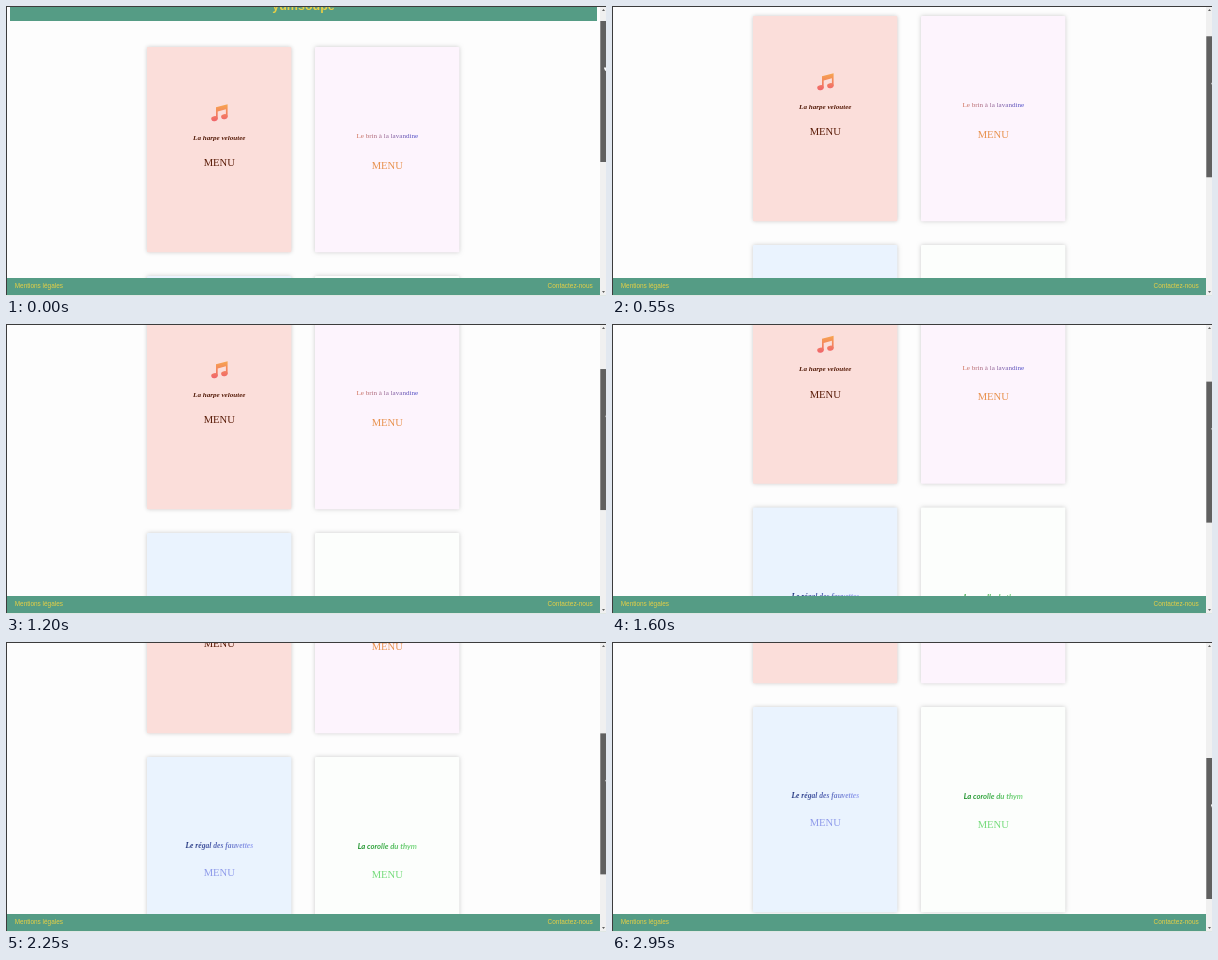
These frames come from a looping animation (600x290 px, 3 s). An HTML page with a canvas:

```html
<!DOCTYPE html>
<html lang="fr">
<head>
<meta charset="utf-8">
<title>Menus</title>
<style>
html, body { margin: 0; width: 100%; height: 100%; overflow: hidden; background: #fdfdfd; }
canvas { display: block; width: 600px; height: 290px; }
</style>
</head>
<body>
<canvas id="stage" width="600" height="290"></canvas>
<script>
const ctx = document.getElementById('stage').getContext('2d');
const LOOP = 3000, STEP = 50;
const GREEN = '#559c85', YELLOW = '#e6cf45';
const SERIF = '"Liberation Serif", serif';
const SANS = '"Liberation Sans", Arial, sans-serif';

// time, scroll distance, pointer x
const DRAG = [
  [0, 0, 598], [550, 31, 599.3], [1200, 61, 599.4], [1600, 86.5, 599.3],
  [1650, 90.7, 599.2], [1850, 121.5, 598.6], [2250, 155, 599.3], [2950, 205, 598.9]
];

const CARDS = [
  { x: 141, y: 41, fill: '#fbdeda', name: 'La harpe veloutee', font: 'italic bold 7.1px ' + SERIF,
    base: 92.5, from: '#4f1a08', to: '#5a1c08', menu: '#5a1c08', menuBase: 119, note: true },
  { x: 309, y: 41, fill: '#fdf4fd', name: 'Le brin à la lavandine', font: '7.1px ' + SERIF,
    base: 91.3, from: '#d8785c', to: '#4c4fd0', menu: '#e8924f', menuBase: 121.5 },
  { x: 141, y: 270, fill: '#eaf3fe', name: 'Le régal des fauvettes', font: 'italic bold 7.6px ' + SERIF,
    base: 91, from: '#22357f', to: '#98a4f2', menu: '#8f9bea', menuBase: 119 },
  { x: 309, y: 270, fill: '#fcfefc', name: 'La corolle du thym', font: 'italic bold 7.7px Lato, sans-serif',
    base: 92, from: '#0f8a1e', to: '#86e08c', menu: '#76dc7c', menuBase: 121 }
];

const secant = i => (DRAG[i + 1][1] - DRAG[i][1]) / (DRAG[i + 1][0] - DRAG[i][0]);

function slope(i) {
  const last = DRAG.length - 1;
  if (i === 0) return secant(0);
  if (i === last) return secant(last - 1);
  const a = secant(i - 1), b = secant(i);
  return 2 * a * b / (a + b);
}

function dragAt(t) {
  t = Math.min(t, 2950);
  let i = 0;
  while (i < DRAG.length - 2 && t > DRAG[i + 1][0]) i++;
  const [t0, y0, x0] = DRAG[i], [t1, y1, x1] = DRAG[i + 1];
  const h = t1 - t0, u = (t - t0) / h, v = 1 - u;
  const scroll = v * v * (1 + 2 * u) * y0 + u * u * (3 - 2 * u) * y1
    + h * u * v * (v * slope(i) - u * slope(i + 1));
  return { scroll, x: x0 + (x1 - x0) * u };
}

function rect(x, y, w, h, fill) {
  ctx.fillStyle = fill;
  ctx.fillRect(x, y, w, h);
}

function text(str, x, y, font, fill, align) {
  ctx.font = font;
  ctx.fillStyle = fill;
  ctx.textAlign = align;
  ctx.fillText(str, x, y);
}

function blend(x0, y0, x1, y1, from, to) {
  const g = ctx.createLinearGradient(x0, y0, x1, y1);
  g.addColorStop(0, from);
  g.addColorStop(1, to);
  return g;
}

function polygon(points) {
  ctx.beginPath();
  points.forEach(([x, y]) => ctx.lineTo(x, y));
  ctx.fill();
}

function musicNote(x, y) {
  ctx.save();
  ctx.translate(x, y);
  ctx.fillStyle = blend(0, 0, 0, 17, '#f7a64f', '#f0646c');
  polygon([[5, 3], [16.6, 0], [16.6, 12.5], [14.9, 12.5], [14.9, 5], [6.7, 7.2], [6.7, 14.5], [5, 14.5]]);
  [[3.5, 14.4], [13.4, 12.4]].forEach(([cx, cy]) => {
    ctx.beginPath();
    ctx.ellipse(cx, cy, 3.3, 2.5, -0.2, 0, 7);
    ctx.fill();
  });
  ctx.restore();
}

function card(c) {
  ctx.save();
  ctx.shadowColor = 'rgba(0,0,0,0.2)';
  ctx.shadowBlur = 4;
  ctx.fillStyle = c.fill;
  ctx.beginPath();
  ctx.roundRect(c.x, c.y, 144.3, 205.2, 1);
  ctx.fill();
  ctx.restore();
  const mid = c.x + 72.3;
  if (c.note) musicNote(c.x + 64, c.y + 57.3);
  text(c.name, mid, c.y + c.base, c.font, blend(mid - 32, 0, mid + 32, 0, c.from, c.to), 'center');
  text('MENU', mid, c.y + c.menuBase, '10.6px ' + SERIF, c.menu, 'center');
}

function scrollbar(shift, x) {
  rect(594, 1, 6, 289, '#f0f0f0');
  rect(594.3, 15 + shift, 5.7, 141, '#606060');
  ctx.fillStyle = '#606060';
  polygon([[596, 5], [597.5, 3], [599, 5]]);
  polygon([[596, 285], [597.5, 287], [599, 285]]);
  ctx.fillStyle = '#fff';
  polygon([[x, 62 + shift], [x + 1, 61 + shift], [600, 62 + shift], [600, 65 + shift], [x + 1, 64.5 + shift]]);
}

function draw(t) {
  const { scroll, x } = dragAt(t);
  rect(0, 0, 600, 290, '#fdfdfd');
  ctx.save();
  ctx.translate(0, -scroll);
  rect(4, -30, 587, 45, GREEN);
  text('yumsoupe', 297.5, 4, 'bold 12.5px ' + SANS, YELLOW, 'center');
  CARDS.forEach(card);
  ctx.restore();

  rect(0, 272, 594, 17, GREEN);
  text('Mentions légales', 8.7, 282.4, '6.45px ' + SANS, YELLOW, 'left');
  text('Contactez-nous', 586.7, 282.4, '6.45px ' + SANS, YELLOW, 'right');
  scrollbar(scroll * 0.4927, x);
  rect(0, 289, 600, 1, '#dfe7e4');
  rect(0, 0, 600, 1, '#3c3c3c');
  rect(0, 0, 1, 289, '#3c3c3c');
}

const start = performance.now();
function tick() {
  const t = (performance.now() - start) % LOOP;
  draw(Math.floor(t / STEP) * STEP);
  requestAnimationFrame(tick);
}
tick();
</script>
</body>
</html>
```
